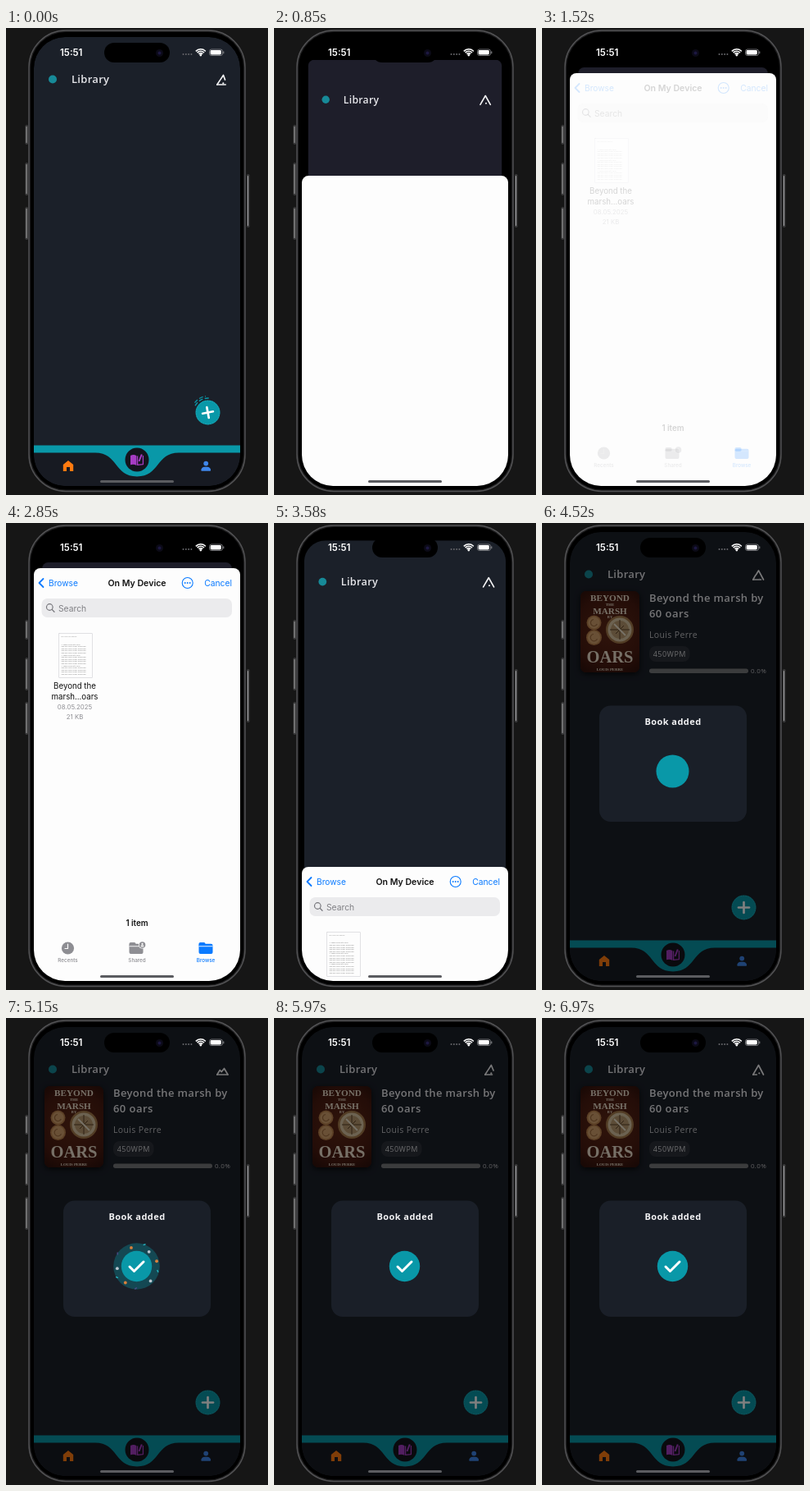
An HTML page with a canvas that plays this animation: 320x569 px, repeating every 7000 ms.

```html
<!DOCTYPE html>
<html lang="en">
<head>
<meta charset="utf-8">
<title>Library</title>
<style>
html, body { margin: 0; width: 100%; height: 100%; overflow: hidden; background: #161616; }
canvas { display: block; width: 320px; height: 569px; }
</style>
</head>
<body>
<canvas id="stage"></canvas>
<script>
const W = 320, H = 569, LOOP = 7000;
const TEAL = '#0998a8', BLUE = '#0a7aff', GREY = '#8e8e93';
const SANS = 'Inter, Roboto, sans-serif';
const OPEN = '"Open Sans", "Noto Sans", sans-serif';
const SERIF = '"Liberation Serif", "Noto Serif", serif';
const canvas = document.getElementById('stage');
const c = canvas.getContext('2d');
const dpr = window.devicePixelRatio || 1;
canvas.width = W * dpr;
canvas.height = H * dpr;

const clamp = x => Math.max(0, Math.min(1, x));
const ramp = (t, a, b) => clamp((t - a) / (b - a));
const mix = (a, b, k) => a + (b - a) * k;
const easeOut = x => 1 - (1 - x) ** 3;
const smooth = x => x * x * (3 - 2 * x);
const backOut = x => 1 + 2.7 * (x - 1) ** 3 + 1.7 * (x - 1) ** 2;

// Critically damped spring from 0 to 1
function spring(ms) {
  if (ms <= 0) return 0;
  const w = ms * 0.0108;
  const v = 1 - (1 + w) * Math.exp(-w);
  return v > 0.994 ? 1 : v;
}

function box(x, y, w, h, r, fill) {
  c.beginPath();
  c.roundRect(x, y, w, h, r);
  if (fill) { c.fillStyle = fill; c.fill(); }
}

function disc(x, y, r, fill) {
  c.beginPath();
  c.arc(x, y, r, 0, Math.PI * 2);
  c.fillStyle = fill;
  c.fill();
}

function line(points, color, width) {
  c.beginPath();
  points.forEach(([x, y], i) => i ? c.lineTo(x, y) : c.moveTo(x, y));
  c.strokeStyle = color;
  c.lineWidth = width;
  c.stroke();
}

function arc(x, y, r, a, b, color, width) {
  c.beginPath();
  c.arc(x, y, r, a, b);
  c.strokeStyle = color;
  c.lineWidth = width;
  c.stroke();
}

// y is the baseline
function text(str, x, y, font, color, align = 'left', spacing = 0) {
  c.font = font;
  c.fillStyle = color;
  c.textAlign = align;
  c.letterSpacing = spacing + 'px';
  c.fillText(str, x, y);
  c.letterSpacing = '0px';
}

function layer(draw) {
  c.save();
  draw();
  c.restore();
}

function phoneBody() {
  c.fillStyle = '#161616';
  c.fillRect(0, 0, W, H);
  for (const [x, y, h] of [[23.5, 118, 24], [23.5, 164, 40], [23.5, 218, 40], [294, 178, 65]]) {
    box(x, y, 3.5, h, 1.5, '#3a3a3b');
    box(x + 1, y + 2, 1, h - 4, 0.5, '#a4a4a6');
  }
  box(27, 2, 266, 563.5, 46, '#1d1d1e');
  box(28, 3, 264, 561.5, 45);
  c.strokeStyle = '#525254';
  c.lineWidth = 1.4;
  c.stroke();
  box(30, 5, 260, 557.5, 43, '#000');
}

function statusBar() {
  box(120, 18, 80, 24, 12, '#000');
  disc(187.5, 30.5, 4.5, '#0b0a17');
  disc(187.5, 30.5, 2, '#1c1740');
  text('15:51', 66, 34, '600 11.5px ' + SANS, '#fff');
  for (let i = 0; i < 4; i++) disc(216.5 + i * 3.3, 32, 1, '#66676b');
  for (const r of [3.2, 5.7, 8.2]) arc(237.8, 34, r, -Math.PI * 0.76, -Math.PI * 0.24, '#fff', 1.6);
  disc(237.8, 33, 1.4, '#fff');
  box(248.5, 26, 16, 7.5, 2.4);
  c.strokeStyle = '#8d8e92';
  c.lineWidth = 0.8;
  c.stroke();
  box(249.6, 27.1, 13.2, 5.3, 1.4, '#fff');
  box(265.3, 28.3, 1, 3, 0.5, '#8d8e92');
}

// Poses: time, apex x, apex y, right end x, right end y, base length, second peak, dot
const POSES = [
  [0, 264.5, 57.5, 270.5, 69, 0.35, 0, 1],
  [700, 264.5, 58, 270.5, 69, 0.9, 0.2, 0],
  [1090, 266.5, 61.5, 271, 69, 1, 1, 0],
  [1400, 265.5, 60, 271, 69, 1, 0.4, 0],
  [1760, 265.5, 57.5, 267.5, 63, 0.8, 0, 1],
  [2350, 264.5, 57.5, 271, 69, 0, 0, 1],
  [2650, 264.5, 57.5, 271, 69, 0, 0, 1],
  [2910, 264.5, 57.5, 270.5, 69, 0.35, 0, 1]
];

function peakIcon(t) {
  const u = (t + 1760) % 2910;
  const i = POSES.findIndex(p => p[0] > u);
  const a = POSES[i - 1], b = POSES[i];
  const k = smooth(ramp(u, a[0], b[0]));
  const [, ax, ay, rx, ry, base, peak, dot] = a.map((v, j) => mix(v, b[j], k));
  const slope = (f, dy) => [mix(257.8, ax, f), mix(69, ay, f) + dy * peak];
  c.lineCap = c.lineJoin = 'round';
  line([slope(0, 0), slope(0.4, -2.5), slope(0.62, 1.3), [ax, ay], [rx, ry]], '#f4f4f5', 1.7);
  if (base > 0.02) line([[257.8, 69], [257.8 + 13 * base, 69]], '#f4f4f5', 1.6);
  if (dot > 0.02) disc(265.3, 67.3, 1.1 * dot, '#f4f4f5');
}

function coin(x, y, r) {
  disc(x, y, r, '#b9804c');
  disc(x, y, r - 1.8, '#d3a26c');
  arc(x, y, r * 0.45, 0.4, 4.6, '#a06c3f', 1.2);
}

function cover() {
  layer(() => {
    c.shadowColor = 'rgba(0,0,0,.75)';
    c.shadowBlur = 7 * dpr;
    c.shadowOffsetY = 2 * dpr;
    box(47, 83, 72, 99, 7, '#47180f');
  });
  const g = c.createRadialGradient(83, 130, 8, 83, 132, 66);
  g.addColorStop(0, '#5c2615');
  g.addColorStop(0.6, '#481a10');
  g.addColorStop(1, '#250d09');
  box(47, 83, 72, 99, 7, g);
  const cream = '#efe2cf';
  const put = (s, y, size) => text(s, 83, y, `bold ${size}px ${SERIF}`, cream, 'center');
  put('BEYOND', 95, 11.2);
  put('THE', 100.5, 5);
  put('MARSH', 110.5, 11.2);
  put('BY', 115.5, 4.5);
  coin(63.5, 121.5, 9);
  coin(63.5, 139.5, 9.5);
  disc(95, 130, 17, '#a67a4b');
  disc(95, 130, 14.5, '#d9c6a4');
  disc(95, 130, 11, '#b99a6e');
  for (let i = 0; i < 8; i++) {
    const a = i * Math.PI / 4, r = i % 2 ? 7 : 12;
    line([[95, 130], [95 + r * Math.cos(a), 130 + r * Math.sin(a)]], '#5d4027', 1);
  }
  line([[88, 123], [102, 137]], '#f0e5cf', 1.8);
  put('OARS', 170, 20.5);
  put('LOUIS PERRE', 180, 4.8);
}

function book() {
  cover();
  const title = '600 13px ' + OPEN;
  text('Beyond the marsh by', 131, 96, title, '#ececef', 'left', 0.35);
  text('60 oars', 131, 115, title, '#ececef', 'left', 0.45);
  text('Louis Perre', 131, 140, '10.5px ' + OPEN, '#c6c7ca', 'left', 0.35);
  box(131, 150, 49.5, 19, 8, '#2d3038');
  text('450WPM', 155.8, 163, '9px ' + OPEN, '#dcdde0', 'center', 0.5);
  box(131, 177.5, 121, 5.5, 2.7, '#77787b');
  text('0.0%', 255, 183, '8px ' + OPEN, '#c2c3c6', 'left', 0.3);
}

function addButton(t) {
  const k = ramp(t, 0, 600);
  const x = 246.5, y = 468.5;
  disc(x, y, 15, TEAL);
  c.setLineDash([1.5, 1.5]);
  arc(x, y, 14.3, 0, 7, 'rgba(120,220,228,.35)', 0.7);
  c.setLineDash([]);
  if (k < 1) layer(() => {
    c.globalAlpha *= 1 - k;
    c.lineCap = 'butt';
    c.setLineDash([5, 2.5]);
    const a = -2.65 + k * 1.6;
    arc(x, y, 17.5, a, a + 1.15, TEAL, 1.5);
    arc(x, y, 20, a + 0.15, a + 0.95, TEAL, 1.2);
  });
  layer(() => {
    c.translate(x, y);
    c.rotate(-0.19 * (1 - k) * Math.cos(k * 7));
    c.lineCap = 'round';
    line([[-6.5, 0], [6.5, 0]], '#fff', 2.7);
    line([[0, -6.5], [0, 6.5]], '#fff', 2.7);
  });
}

function navBar() {
  c.fillStyle = '#171a22';
  c.fillRect(34, 517, 252, 42);
  c.beginPath();
  c.moveTo(34, 508.6);
  c.lineTo(286, 508.6);
  c.lineTo(286, 517.6);
  c.lineTo(211, 517.6);
  c.bezierCurveTo(183, 517.6, 188, 546.5, 160, 546.5);
  c.bezierCurveTo(132, 546.5, 137, 517.6, 109, 517.6);
  c.lineTo(34, 517.6);
  c.fillStyle = TEAL;
  c.fill();
  disc(160, 526, 14.5, '#14141d');
  c.fillStyle = '#a63cc4';
  c.beginPath();
  c.moveTo(152, 521);
  c.quadraticCurveTo(156, 519, 159.4, 521.2);
  c.lineTo(159.4, 533);
  c.quadraticCurveTo(156, 530.8, 152, 532.2);
  c.fill();
  c.lineJoin = 'round';
  line([[160.6, 521.5], [160.6, 532.3], [167.4, 531.6], [167.4, 521]], '#a63cc4', 1.3);
  line([[162.5, 528], [165.8, 519.5]], '#a63cc4', 2);

  c.fillStyle = '#ff7a10';
  c.beginPath();
  for (const [x, y] of [[76, 527], [82.2, 532], [82.2, 540], [78, 540], [78, 535],
    [74, 535], [74, 540], [69.8, 540], [69.8, 532]]) c.lineTo(x, y);
  c.fill();
  disc(244.2, 530.6, 2.9, '#3f86ea');
  box(238.3, 534.7, 11.8, 5, [5, 5, 1, 1], '#3f86ea');
}

function library(t, p) {
  const tint = ramp(p, 0.3, 0.75);
  c.fillStyle = `rgb(${mix(27, 30, tint)},${mix(32, 30, tint)},${mix(41, 42, tint)})`;
  c.fillRect(34, 11, 252, 548);
  disc(57, 62.5, 5, '#178a98');
  text('Library', 80, 67.3, '600 13px ' + OPEN, '#e6e6ea', 'left', 0.3);
  layer(() => peakIcon(t));
  if (t >= 3900) book();
  addButton(t);
  navBar();
}

function folder(x, y, color) {
  box(x - 8.5, y - 7, 8, 5, 1.8, color);
  box(x - 8.5, y - 5.2, 17, 12.2, 2, color);
  c.fillStyle = '#fdfdfd';
  c.fillRect(x - 8.5, y - 2.7, 17, 0.9);
}

function page(x, y) {
  box(x, y, 41, 54, 0.5, '#fdfdfd');
  c.strokeStyle = '#d5d5d8';
  c.lineWidth = 0.7;
  c.stroke();
  const font = '2.6px ' + SERIF;
  text('Beyond the marsh', x + 3, y + 4.5, font, '#999');
  for (let i = 0; i < 15; i++) {
    const s = i % 5 === 0 ? 'A small boat left early' : 'and the slow water went past';
    text(s, x + 3, y + 14 + i * 2.6, font, '#777');
  }
}

function sheetContent() {
  c.lineCap = c.lineJoin = 'round';
  line([[45.5, 68], [40.5, 73], [45.5, 78]], BLUE, 1.8);
  text('Browse', 52, 77, '10.2px ' + SANS, BLUE);
  text('On My Device', 160, 77, '600 10.6px ' + SANS, '#111', 'center');
  arc(221.7, 73, 6.5, 0, 7, BLUE, 1.1);
  for (const d of [-3, 0, 3]) disc(221.7 + d, 73, 0.95, BLUE);
  text('Cancel', 276, 77, '10.3px ' + SANS, BLUE, 'right');
  box(43.5, 92, 232.5, 23, 7, '#ebebed');
  arc(53.3, 102.5, 3.8, 0, 7, '#77777c', 1.2);
  line([[56.2, 105.4], [59, 108.2]], '#77777c', 1.3);
  text('Search', 64, 107.6, '10.3px ' + SANS, '#808085');

  page(64.5, 134.5);
  text('Beyond the', 84, 202.3, '9.7px ' + SANS, '#111', 'center');
  text('marsh...oars', 84, 215.3, '9.7px ' + SANS, '#111', 'center');
  text('08.05.2025', 84, 227, '7.8px ' + SANS, GREY, 'center');
  text('21 KB', 84, 239, '7.8px ' + SANS, GREY, 'center');
  text('1 item', 160, 491, '600 9.8px ' + SANS, '#111', 'center');

  disc(75.5, 518, 7.6, GREY);
  line([[75.5, 513], [75.5, 518.5], [72, 518.5]], '#fdfdfd', 1.2);
  folder(159, 518, GREY);
  disc(166.5, 514, 4.6, '#fdfdfd');
  disc(166.5, 514, 3.8, GREY);
  disc(166.5, 512.9, 1.1, '#fdfdfd');
  box(164.6, 514.5, 3.8, 1.8, 0.9, '#fdfdfd');
  folder(244, 518, BLUE);
  const tab = '500 6.3px ' + SANS;
  text('Recents', 75.5, 535, tab, GREY, 'center');
  text('Shared', 160, 535, tab, GREY, 'center');
  text('Browse', 244, 535, tab, BLUE, 'center');
}

function sheet(t, p) {
  c.translate(0, (1 - p) * 503);
  box(34, 55, 252, 520, [8, 8, 0, 0], '#fdfdfd');
  c.globalAlpha = ramp(t, 1500, 1620);
  if (c.globalAlpha) sheetContent();
}

function burst(t) {
  const x = 159.5, y = 302.5;
  const k = ramp(t, 4850, 5550);
  if (k > 0 && k < 1) layer(() => {
    const out = easeOut(k), fade = Math.min(1, (1 - k) * 1.75);
    const alpha = c.globalAlpha * fade;
    c.globalAlpha = alpha * 0.34;
    disc(x, y, 18.5 + 12 * out, TEAL);
    c.globalAlpha = alpha;
    const tones = ['#d9803c', '#25b6c4', '#b9c5cf', '#4c4a86'];
    for (let i = 0; i < 11; i++) {
      const a = i * 0.571 - 0.25 + 0.15 * Math.sin(i * 5);
      const r = 18 + (9 + 2.5 * Math.sin(i * 3)) * out;
      const px = x + r * Math.cos(a), py = y + r * Math.sin(a);
      const tone = tones[i % 4];
      if (i % 2) line([[px, py], [px + 3 * Math.cos(a + 1), py + 3 * Math.sin(a + 1)]], tone, 1.4);
      else disc(px, py, 1.9, tone);
    }
  });
  const pop = ramp(t, 4300, 4600);
  if (pop > 0) disc(x, y, Math.max(0, 18.7 * backOut(pop)), TEAL);
  const d = smooth(ramp(t, 4550, 4850));
  if (d > 0) {
    const a = Math.min(1, d / 0.35), b = ramp(d, 0.35, 1);
    const pts = [[151, 303], [151 + 5.5 * a, 303 + 5.5 * a]];
    if (b > 0) pts.push([156.5 + 11.5 * b, 308.5 - 11.5 * b]);
    c.lineCap = c.lineJoin = 'round';
    line(pts, '#fff', 3);
  }
}

function dialog(t) {
  const k = ramp(t, 4150, 4330);
  if (!k) return;
  c.fillStyle = `rgba(0,0,0,${0.5 * k})`;
  c.fillRect(34, 11, 252, 548);
  layer(() => {
    c.globalAlpha = k;
    box(70, 222.5, 180, 141.5, 14, '#1a1f28');
    text('Book added', 160, 246, '700 11px ' + OPEN, '#f2f2f4', 'center', 0.45);
    burst(t);
  });
}

function draw(t) {
  c.setTransform(dpr, 0, 0, dpr, 0, 0);
  phoneBody();
  const p = spring(t - 600) - spring(t - 3343.5);
  layer(() => {
    box(34, 11, 252, 547, 38);
    c.clip();
    layer(() => {
      const s = 1 - 0.08 * p;
      c.translate(160, 11 + 37 * p);
      c.scale(s, s);
      c.translate(-160, -11);
      box(34, 11, 252, 547, Math.max(8, 38 - 40 * p));
      c.clip();
      library(t, p);
    });
    if (p > 0) layer(() => sheet(t, p));
    dialog(t);
    box(115, 551, 90, 3, 1.5, '#5b5c60');
  });
  statusBar();
}

let start;
function tick(now) {
  start ??= now;
  draw((now - start) % LOOP);
  requestAnimationFrame(tick);
}
draw(0);
requestAnimationFrame(tick);
</script>
</body>
</html>
```
